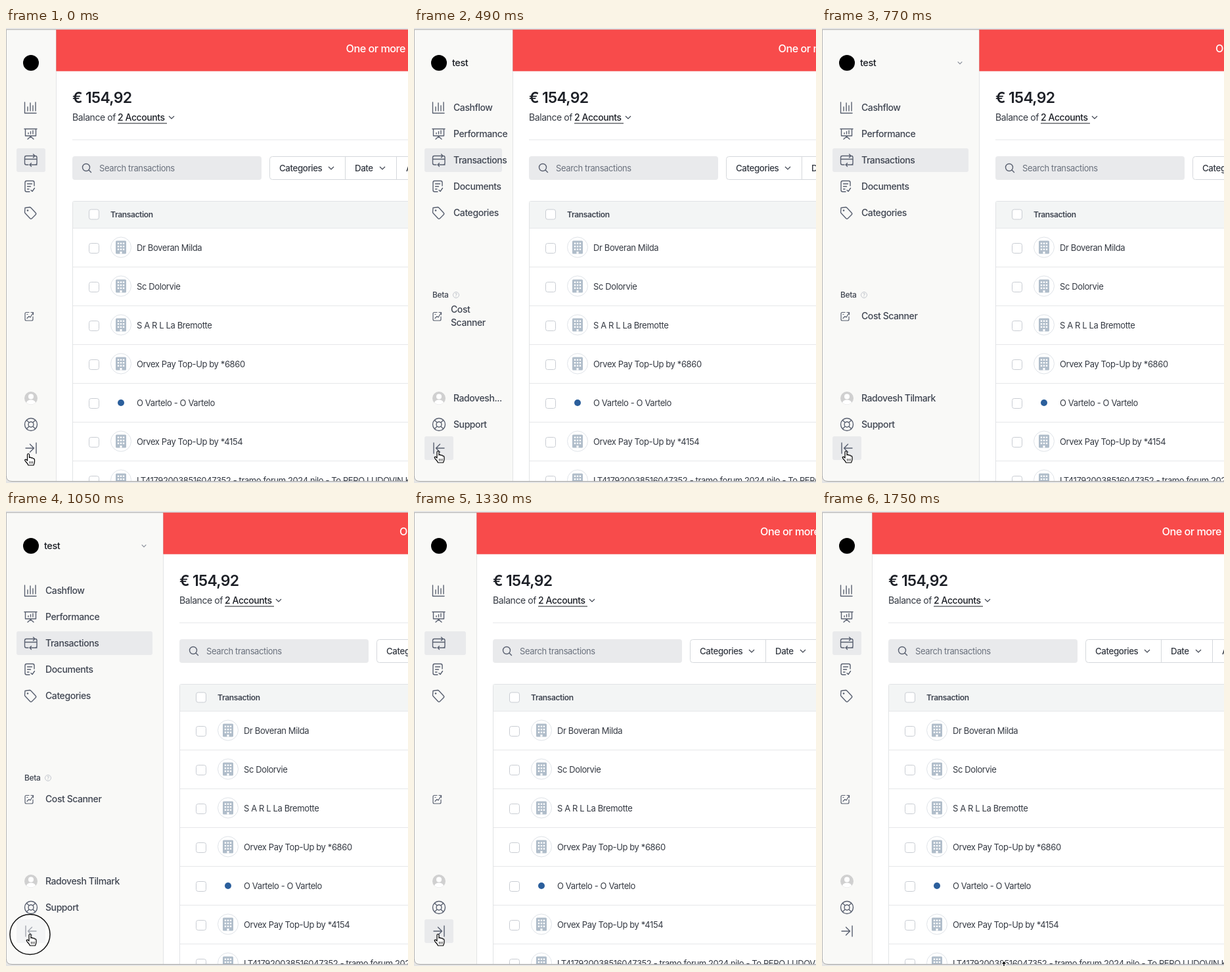
Write an HTML page that moves like this. It is 612 by 692 pixels and loops after 1.82 s.

```html
<!DOCTYPE html>
<html lang="en">
<head>
<meta charset="utf-8">
<title>Sidebar toggle</title>
<style>
  html, body { margin: 0; width: 100%; height: 100%; overflow: hidden; background: #e4e4e4; }
  svg { display: block; }
  text { font-family: Inter, "Liberation Sans", sans-serif; letter-spacing: -0.03em; white-space: pre; }
  .icon { fill: none; stroke: #596070; stroke-width: 1.4; stroke-linecap: round; stroke-linejoin: round; }
</style>
</head>
<body>
<svg id="stage" width="612" height="692" viewBox="0 0 612 692"></svg>
<script>
const LOOP = 1820, STEP = 70;
const CLOSED = 77, OPEN = 240, SLIDE = 300;
const OPEN_AT = 390, CLOSE_AT = 1148;
const INK = '#1d2027', SLATE = '#3f4551', LINE = '#e6e7e9', HOVER = '#e9eaec', EDGE = '#d5d8dc';
const RED = '#f84b4b', RED_EDGE = '#e07f7f';
const USER = 'Radovesh Tilmark';

const text = (x, cy, s, size = 13, weight = 400, fill = '#343942', extra = '') =>
  `<text x="${x}" y="${cy + size * 0.36}" font-size="${size}" font-weight="${weight}" fill="${fill}" ${extra}>${s}</text>`;
const rect = (x, y, w, h, fill, r = 0, extra = '') =>
  `<rect x="${x}" y="${y}" width="${w}" height="${h}" rx="${r}" fill="${fill}" ${extra}/>`;
const circle = (x, y, r, fill, extra = '') =>
  `<circle cx="${x}" cy="${y}" r="${r}" fill="${fill}" ${extra}/>`;
const path = (d, extra = 'class="icon"') => `<path d="${d}" ${extra}/>`;
const chevron = (x, y, s = 4, color = SLATE) =>
  path(`M${x - s} ${y - s / 2}l${s} ${s}l${s} ${-s}`, `fill="none" stroke="${color}" stroke-width="1.2"`);
const rule = (x, y, color = LINE) => rect(x, y, 700, 1, color);
const checkbox = y => rect(49.5, y - 7.5, 15, 15, '#fff', 3, 'stroke="#c9cdd3"');

function building(x, y) {
  let s = circle(x, y, 15.5, '#fff', 'stroke="#dfe3e8"') + rect(x - 8, y - 10, 16, 20, '#b0bdca', 1.5);
  for (const dy of [-7, -2.5, 2])
    for (const dx of [-5.2, -1.2, 2.8]) s += rect(x + dx, y + dy, 2.4, 2.4, '#fff');
  return s + rect(x - 1.5, y + 6.5, 3, 3.5, '#fff');
}

function row(name, i) {
  const y = 334 + 59 * i;
  const mark = i === 4 ? circle(98, y, 5, '#2b5f9c') : building(98, y - 0.5);
  return checkbox(y + 1) + mark + text(122, y, name) + rule(25, y + 29);
}

function sidebarIcons() {
  return circle(38, 53, 12, '#000') +
    path('M28.5 113V129.500H46M33 126V120M37 126V114M41 126V118M45 126V113') +
    path('M28 153.500H47M29.500 153.500V164H45.500V153.500M37.500 164V166.500M37.500 165L33 169M37.500 165L42 169M34 161V159.500M37.500 161V157.500M41 161V156') +
    path('M39 194.500H31Q28.500 194.500 28.500 197V205.500Q28.500 208 31 208H34M28.500 199.500H47M42 208H44.500Q47 208 47 205.500V197Q47 194.500 44.500 194.500H38M41.500 192L44 194.500L41.500 197M47 208H36M38.500 205.500L36 208L38.500 210.500') +
    path('M43 240V235Q43 232.500 40.500 232.500H31.500Q29 232.500 29 235V246.500Q29 249 31.500 249H36M32.500 237H39.500M32.500 241H37.500M32.500 245H35M38 246.500L40 248.500L43.500 243.500') +
    path('M29 273.500L36 272.500Q37 272.500 38 273.500L45 281Q46.500 282.500 45 284L39.500 289.500Q38 291 36.500 289.500L29.500 282Q28.500 281 28.500 280Z') +
    circle(33, 277.5, 1.3, '#596070') +
    path('M35 432.500H31Q29 432.500 29 434.500V443Q29 445 31 445H39Q41 445 41 443V439M32 441.500L35 438.500L37 440L41 433.500M38 432.500H41.500V436M32 435.500H33', 'class="icon" style="stroke-width:1.2"') +
    circle(38, 563, 10, '#d0d0d0') + circle(38, 560.5, 4, '#fff') +
    path('M31 570Q32 565.500 38 565.500Q44 565.500 45 570Q38 575.500 31 570Z', 'fill="#fff"') +
    circle(38, 603, 9.5, 'none', 'class="icon"') + circle(38, 603, 4, 'none', 'class="icon"') +
    path('M31.500 596.500L35 600M44.500 596.500L41 600M31.500 609.500L35 606M44.500 609.500L41 606');
}

function sidebarLabels() {
  const items = ['Cashflow', 'Performance', 'Transactions', 'Documents', 'Categories'];
  const label = (y, s, extra = '', x = 60) => text(x, y, s, 14, 500, SLATE, extra);
  return text(58, 53, 'test', 14.5, 500, INK) +
    items.map((s, i) => label(121 + 40 * i, s)).join('') +
    text(28, 406, 'Beta', 12, 500, SLATE) +
    circle(64, 406, 4.5, 'none', 'stroke="#c3c7ce"') +
    text(64, 406, '?', 7, 400, '#a9aeb8', 'text-anchor="middle"') +
    `<g id="wide">${label(438, 'Cost Scanner')}</g>` +
    `<g id="narrow">${label(428, 'Cost', '', 56)}${label(448, 'Scanner', '', 56)}</g>` +
    label(563, USER, 'id="user"') + label(603, 'Support') +
    `<g id="menu">${chevron(0, 53, 3.3, '#8a909b')}</g>`;
}

function page() {
  const names = [
    'Dr Boveran Milda', 'Sc Dolorvie', 'S A R L La Bremotte', 'Orvex Pay Top-Up by *6860',
    'O Vartelo - O Vartelo', 'Orvex Pay Top-Up by *4154',
    'LT417920038516047352 - tramo forum 2024 nilo - To PEPO LUDOVIN KAR'
  ];
  return rect(-1, 3, 700, 690, '#fff') + rect(-1, 3, 1, 690, '#e3e4e5') +
    rect(-1, 2, 700, 63.5, RED_EDGE) + rect(0, 3, 700, 62.5, RED) +
    text(24, 105.5, '€ 154,92', 23, 600, INK) +
    text(24, 136, 'Balance of', 14) + text(93, 136, '2 Accounts', 14, 500, INK) +
    rect(93, 144.5, 75, 1, INK) + chevron(175, 136) +
    rule(24, 169.5) +
    rect(24, 195, 288, 36, HOVER, 4) +
    circle(45, 212, 5.5, 'none', 'class="icon"') + path('M49 216L52.500 219.500') +
    text(65, 213, 'Search transactions', 13, 400, '#6a717d') +
    rect(324.5, 195.5, 400, 35, '#fff', 4, `stroke="${EDGE}"`) +
    rect(439, 195, 1, 36, EDGE) + rect(517, 195, 1, 36, EDGE) +
    text(339, 213, 'Categories', 13.3, 500) + chevron(418, 213) +
    text(454, 213, 'Date', 13.3, 500) + chevron(496, 213) +
    text(532, 213, 'Amount', 13.3, 500) +
    rect(24.5, 263.5, 700, 500, '#fff', 2, 'stroke="#e1e3e5"') +
    rect(25, 264, 700, 40, '#f3f5f5') + rule(25, 304) +
    checkbox(283.5) + text(82, 283.5, 'Transaction', 12, 600, SLATE) +
    names.map(row).join('');
}

const outline = 'stroke-width="1.2" stroke-linejoin="round"';
const cursors = {
  hand: path('M-3.500 -7Q-3.500 -8.500 -2 -8.500Q-.500 -8.500 -.500 -7V-2.500Q1.500 -4 2.500 -2Q4.500 -3 5.300 -1Q7.500 -1.500 7.500 1V3.500Q7.500 6 6 9H-2Q-3 6.500 -5.500 4Q-8 1.500 -7 .500Q-5.500 -.500 -3.500 2Z', `fill="#fff" stroke="#000" ${outline}`) +
    path('M0 3V6.500M2.300 3V6.500M4.600 3V6.500', 'stroke="#000" stroke-width=".8"'),
  arrow: path('M0 0V14L3.200 11L5.300 16L7.700 15L5.600 10.200H10Z', `fill="#000" stroke="#fff" ${outline}`),
  resize: path('M0 -4L4.500 1H1.300V9H-1.300V1H-4.500Z', `fill="#000" stroke="#fff" ${outline}`)
};

document.getElementById('stage').innerHTML =
  '<clipPath id="win"><path d="M0 2H612V690H9Q0 690 0 681Z"/></clipPath>' +
  rect(0, 0, 612, 692, '#e4e4e4') +
  '<g clip-path="url(#win)">' +
    rect(0, 2, 612, 1, '#b5b5b5') + rect(0, 3, 612, 690, '#f9f9f7') +
    rect(16, 183, 44, 36, HOVER, 3, 'id="active"') +
    rect(16, 621, 44, 36, HOVER, 3, 'id="hover"') +
    sidebarIcons() + `<g id="labels">${sidebarLabels()}</g>` +
    `<g id="expand">${path('M30 639H42M36.500 633L42.500 639L36.500 645M46 631V647')}</g>` +
    `<g id="collapse">${path('M46 639H34M39.500 633L33.500 639L39.500 645M30 631V647')}</g>` +
    `<g id="page">${page()}</g>` +
    text(0, 31, 'One or more', 16.2, 500, '#fff', 'id="banner"') +
  '</g>' +
  path('M.300 3V681Q.300 689.500 9 689.500H612', 'fill="none" stroke="#a4a4a4"') +
  circle(36.5, 644, 30.5, '#fff', 'id="ring" fill-opacity=".45" stroke="#111" stroke-width="1.5"') +
  Object.entries(cursors).map(([k, s]) => `<g id="${k}">${s}</g>`).join('');

const el = id => document.getElementById(id);
const show = (id, on) => el(id).setAttribute('visibility', on ? 'inherit' : 'hidden');
const move = (id, x, y = 0) => el(id).setAttribute('transform', `translate(${x} ${y})`);

// cubic-bezier(.4, 0, .2, 1), solved by bisection
function ease(x) {
  if (x <= 0) return 0;
  if (x >= 1) return 1;
  let lo = 0, hi = 1, s;
  for (let i = 0; i < 24; i++) {
    s = (lo + hi) / 2;
    const bx = 1.2 * (1 - s) ** 2 * s + 0.6 * (1 - s) * s * s + s ** 3;
    if (bx < x) lo = s; else hi = s;
  }
  return 3 * (1 - s) * s * s + s ** 3;
}

function pointer(t) {
  if (t < 1610) {
    const k = ease(t / 210);
    return ['hand', 36 + 2.5 * k, 656 - 4 * k];
  }
  if (t < 1680) return ['arrow', 84, 662];
  if (t < 1750) return ['arrow', 190, 677];
  return ['resize', 277, 688];
}

function draw(t) {
  const w = Math.floor(CLOSED + (OPEN - CLOSED) *
    (ease((t - OPEN_AT) / SLIDE) - ease((t - CLOSE_AT) / SLIDE)));
  const open = t >= OPEN_AT && t < CLOSE_AT;

  move('page', w);
  el('banner').setAttribute('x', 517.5 + (w - CLOSED) / 2);
  el('active').setAttribute('width', w - 33);
  show('labels', open);
  show('collapse', open);
  show('expand', !open);
  show('wide', open && w >= 175);
  show('narrow', open && w < 175);
  el('user').textContent = w < 202 ? USER.slice(0, 8) + '...' : USER;
  move('menu', Math.max(w - 30, 154));

  el('hover').setAttribute('opacity', t < 1610 ? Math.min(1, t / 140) : 0);
  show('ring', t === 280 || t === 1050);
  const [kind, x, y] = pointer(t);
  for (const k in cursors) show(k, k === kind);
  move(kind, x, y);
}

const start = performance.now();
function tick() {
  const t = (performance.now() - start) % LOOP;
  draw(Math.floor(t / STEP) * STEP);
  requestAnimationFrame(tick);
}
tick();
</script>
</body>
</html>
```
